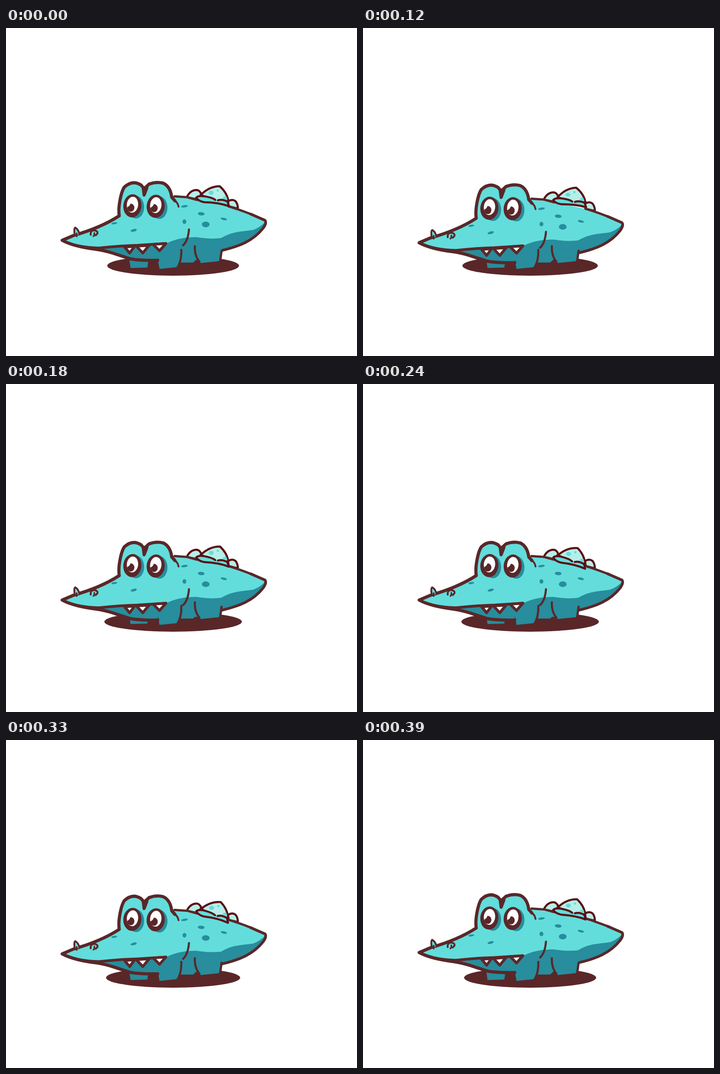
Animation of 775 by 723 pixels, one loop 0.42 s. Source, as an HTML page:

```html
<!DOCTYPE html>
<html lang="en">
<head>
<meta charset="utf-8">
<title>Breathing crocodile</title>
<style>
  html, body { margin: 0; width: 100%; height: 100%; overflow: hidden; background: #fff; }
  svg { display: block; width: 100vw; height: 100vh; }
  .line { fill: none; stroke: #5a2729; stroke-linecap: round; stroke-linejoin: round; }
  .spike { stroke: #5a1015; stroke-width: 4.5; stroke-linejoin: round; stroke-linecap: round; }
  .skin { fill: #62dddb; }
  .shade { fill: #288d9c; }
  .pale { fill: #b6eee8; }
  .dark { fill: #5a2729; }
  .white { fill: #fff; }
</style>
</head>
<body>
<svg viewBox="0 0 775 723">
  <defs>
    <g id="eye">
      <ellipse class="shade" cx="8" cy="3" rx="18" ry="25"/>
      <ellipse class="dark" rx="20" ry="25.5" transform="rotate(5)"/>
      <ellipse class="white" cy="-2.5" rx="12.5" ry="17.5" transform="rotate(6)"/>
      <ellipse class="dark" cx="-3.5" cy="4" rx="8" ry="9"/>
      <path class="white" d="M-12 1Q-9-7-4-6Q-5 0-11 3Z"/>
    </g>
  </defs>

  <ellipse id="shadow" class="dark" cx="369" cy="524" rx="145.5" ry="22"/>

  <path class="shade" d="M272 508H315L312 528L275 529Z"/>
  <path class="shade" d="M333 500L339 531L378 527L382 517H413L421 510L430 518L470 514L477 486H390Z"/>

  <g id="body">
    <g class="spike pale">
      <path d="M399 373Q407 357 421 357Q428 358 431 366L424 378Z"/>
      <path d="M490 382Q500 376 507 382Q512 388 512 398L492 393Z"/>
    </g>
    <path class="skin" d="M124 468L150 457Q210 440 250 414C247 394 254 362 261 351Q279 334 298 346L306 354L316 344Q332 338 347 342C358 347 364 358 366 371L422 379L490 393Q530 404 572 424Q576 430 568 441C545 470 515 481 478 490L470 504H335V512L275 509Q235 495 200 489Q150 483 124 468Z"/>
    <path class="shade" d="M192 487Q230 483 270 480L354 475C375 464 398 461 420 461Q450 466 475 463C500 448 520 449 546 445Q560 440 572 428L568 441C545 470 515 481 478 490L470 505H335V512L275 509Q230 493 192 487Z"/>

    <g class="line" stroke-width="7">
      <path d="M335 512Q300 513 275 509L235 496Q215 490 200 488Q150 482 124 468L150 457Q210 440 250 414C247 394 254 362 261 351Q279 334 298 346L305 354L316 344Q332 338 347 342C358 347 364 358 366 373L373 381"/>
      <path d="M303 352L305 368L311 352"/>
      <path d="M130 471Q160 484 205 485Q250 480 290 479L353 475" stroke-width="6"/>
      <path d="M540 410L572 424Q576 430 568 441C545 470 515 481 478 490" stroke-width="6"/>
      <path d="M372 371L400 373L422 379M491 393Q515 400 545 412" stroke-width="5"/>
      <path d="M370 379Q379 383 381 394" stroke-width="4"/>
      <path d="M404 444Q402 469 391 479" stroke-width="4.5"/>
    </g>

    <g class="line" stroke-width="6">
      <path class="white" d="M262 483L284 481L273 496Z"/>
      <path class="white" d="M288 481L316 479L302 496Z"/>
      <path class="white" d="M325 477L353 475L339 491Z"/>
    </g>

    <g class="line" stroke-width="4">
      <path class="skin" d="M152 457Q149 441 153 440Q161 445 162 455"/>
      <path d="M156 459L156 453"/>
      <path class="skin" d="M187 456Q186 446 195 446Q203 447 202 453L198 457"/>
      <path d="M193 459Q196 457 195 452" stroke-width="3.5"/>
    </g>

    <g class="shade">
      <ellipse cx="394" cy="393" rx="7.5" ry="2.5" transform="rotate(-9 394 393)"/>
      <ellipse cx="431" cy="409.5" rx="7.5" ry="3.7" transform="rotate(5 431 409)"/>
      <ellipse cx="481" cy="421" rx="7" ry="2.6" transform="rotate(13 481 421)"/>
      <ellipse cx="441" cy="433" rx="8.5" ry="6.2"/>
      <ellipse cx="394" cy="427" rx="4.2" ry="5"/>
      <ellipse cx="239" cy="430.500" rx="6.500" ry="2.2" transform="rotate(-8 239 430)"/>
      <ellipse cx="282" cy="446" rx="7" ry="2.8" transform="rotate(-15 282 446)"/>
    </g>
    <use href="#eye" x="279" y="392"/>
    <use href="#eye" x="330.500" y="393"/>

    <g id="fin">
      <path class="spike pale" d="M430 368C440 358 455 349 472 349C481 357 489 367 491 382L470 384Z"/>
      <path class="skin" d="M420 374Q424 369 438 371Q456 374 463 379Q476 377 489 382L492 393L440 385Q425 382 420 374Z"/>
      <path class="spike" fill="none" d="M462 379Q456 374 438 371Q424 369 420 374Q425 382 438 384Q470 385 492 393L489 383Q478 377 468 380"/>
      <g class="skin">
        <ellipse cx="453" cy="363.500" rx="5.500" ry="4.500"/>
        <circle cx="467.500" cy="358.500" r="2.500"/>
        <path d="M478 376Q480 370 487 372L489 379Z"/>
      </g>
    </g>
  </g>

  <g class="line" stroke-width="4.500">
    <path d="M387 489Q388 512 379 527"/>
    <path d="M417 481Q416 502 427 515"/>
    <path d="M476 491L473 513" stroke-width="5"/>
  </g>
</svg>
<script>
  const LOOP = 420, STEP = 30;
  const [body, fin, shadow] = ["body", "fin", "shadow"].map(id => document.getElementById(id));
  const wave = (t, peak) => Math.cos(2 * Math.PI * (t - peak) / LOOP);

  function draw(now) {
    const t = Math.floor(now % LOOP / STEP) * STEP;
    const press = (1 + wave(t, LOOP / 2)) / 2;
    body.setAttribute("transform", `translate(0 ${8.7 * press})`);
    // The back fin swings behind the body's bob.
    fin.setAttribute("transform", `rotate(${1.4 + 4.7 * wave(t, 290)} 420 376)`);
    shadow.setAttribute("rx", 145.5 + 6.7 * press);
    requestAnimationFrame(draw);
  }
  draw(performance.now());
</script>
</body>
</html>
```
